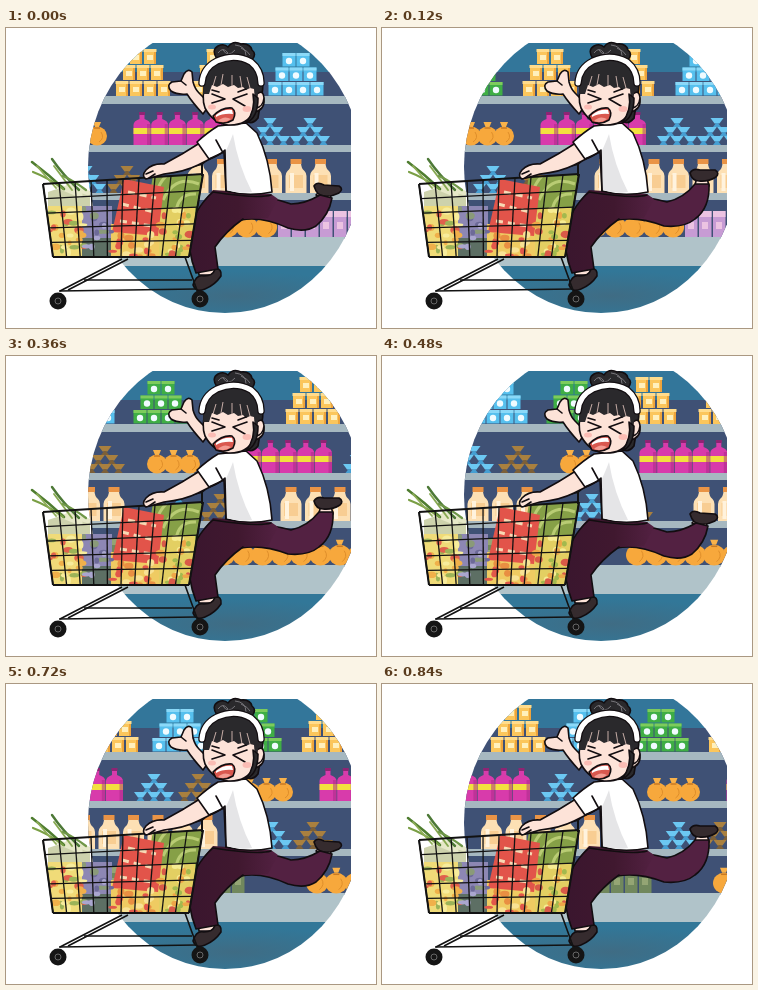
An HTML page for the animation above (960 ms loop, 370 px wide and 300 px high).

```html
<!DOCTYPE html>
<html lang="en">
<head>
<meta charset="utf-8">
<title>Shopping run</title>
<style>
  html, body { margin: 0; width: 100%; height: 100%; overflow: hidden; background: #fff; }
  svg { display: block; width: 370px; height: 300px; }
  #goods { animation: scroll 960ms step-end infinite; }
  #legLow { animation: low 240ms step-end infinite; }
  #legHigh { animation: high 240ms step-end infinite; }
  @keyframes scroll {
    0% { transform: translateX(0); }
    12.5% { transform: translateX(31px); }
    25% { transform: translateX(56px); }
    37.5% { transform: translateX(93px); }
    50% { transform: translateX(130px); }
    62.5% { transform: translateX(155px); }
    75% { transform: translateX(186px); }
    87.5%, 100% { transform: translateX(217px); }
  }
  @keyframes low { 0% { opacity: 1; } 50%, 100% { opacity: 0; } }
  @keyframes high { 0% { opacity: 0; } 50%, 100% { opacity: 1; } }
  .ink { stroke: #120d10; stroke-width: 1.6; stroke-linejoin: round; stroke-linecap: round; }
  .line { fill: none; }
  .skin { fill: #fde3d8; }
  .hair { fill: #2a292c; }
  .pants { fill: #532142; }
  .shoe { fill: #352b2e; }
</style>
</head>
<body>
<svg viewBox="0 0 370 300">
  <defs>
    <clipPath id="frame"><rect x="82" y="15" width="263" height="270"/></clipPath>
    <clipPath id="round"><ellipse cx="219" cy="139" rx="137" ry="146"/></clipPath>
    <clipPath id="basket"><path d="M37 156 197 146 183 229 47 229Z"/></clipPath>
    <radialGradient id="floor" cx=".55" cy=".6" r=".5">
      <stop offset="0" stop-color="#3f6c84"/><stop offset="1" stop-color="#327798"/>
    </radialGradient>
    <linearGradient id="thigh">
      <stop offset="0" stop-color="#3a162e"/><stop offset=".55" stop-color="#40182f"/><stop offset="1" stop-color="#532142"/>
    </linearGradient>
  </defs>

  <g clip-path="url(#frame)"><g clip-path="url(#round)">
    <rect x="80" y="15" width="270" height="30" fill="#33769a"/>
    <rect x="80" y="44" width="270" height="167" fill="#3f5175"/>
    <g fill="#a6b8c0">
      <rect x="80" y="68" width="270" height="8"/>
      <rect x="80" y="117" width="270" height="7"/>
      <rect x="80" y="165" width="270" height="7"/>
    </g>
    <rect x="80" y="209" width="270" height="29" fill="#b0c3c9"/>
    <rect x="80" y="238" width="270" height="50" fill="url(#floor)"/>
    <g id="goods"></g>
  </g></g>

  <!-- raised arm -->
  <path class="ink skin" d="M197 86Q186 74 181 66Q171 67 165 63Q160 57 166 54L175 53 178 46Q182 40 186 44L187 54Q189 61 193 65L204 76Z"/>
  <path class="ink line" stroke-width="1" d="M175 53 180 57"/>

  <!-- back leg, two poses -->
  <g id="legLow">
    <path class="ink skin" d="M310 167 315 162 326 166 322 174Z"/>
    <path class="ink shoe" d="M308 158Q311 153 318 157L333 158Q338 161 333 165Q325 169 318 168Q311 168 308 158Z"/>
    <path class="ink pants" d="M236 166Q262 168 285 176Q299 176 314 167L326 170Q323 187 310 198Q299 205 282 200Q256 188 235 192Z"/>
  </g>
  <g id="legHigh">
    <path class="ink skin" d="M313 157 315 149 325 150 327 158Z"/>
    <path class="ink shoe" d="M308 145Q311 140 318 142L333 142Q338 145 334 149Q326 154 317 153Q310 153 308 145Z"/>
    <path class="ink pants" d="M236 166Q262 168 285 174Q302 170 313 156L327 156Q328 180 313 191Q302 200 282 198Q256 188 235 192Z"/>
  </g>

  <!-- front leg -->
  <path class="ink skin" d="M192 238H210L209 247H193Z"/>
  <path class="ink shoe" d="M187 257Q190 246 198 248Q207 248 209 241Q216 240 215 248Q209 257 199 261Q190 265 187 257Z"/>
  <path fill="url(#thigh)" d="M207 162 265 166 272 171 262 190 237 191Q220 203 209 219L212 241 190 245Q181 222 184 203Q188 181 207 162Z"/>
  <path class="ink line" d="M265 167Q252 171 207 164Q188 181 184 203Q181 222 190 245L212 241 209 219Q220 203 237 191"/>

  <g id="load" clip-path="url(#basket)"></g>
  <g id="leeks"></g>
  <g id="cart"></g>

  <!-- shirt and near arm -->
  <path class="ink skin" d="M197 113 176 126 158 136Q147 135 140 142Q135 148 140 151L151 148 158 146Q178 144 192 137L210 128Z"/>
  <path class="ink line" stroke-width="1" d="M140 146 147 143M143 150 149 146"/>
  <path class="ink" fill="#fff" d="M212 98Q202 104 191 114L203 131 218 124 220 163Q242 169 266 164Q264 132 251 105L240 95Z"/>
  <path fill="#e5e5e7" d="M219 125Q224 114 227 106Q232 137 246 164Q232 166 221 162Z"/>
  <path class="ink line" d="M203 131Q213 128 219 122L220 163M210 112 216 123"/>

  <!-- head -->
  <path class="ink hair" d="M211 31Q205 22 212 18Q218 15 222 19Q227 12 235 16Q244 15 246 22Q251 26 246 32Z"/>
  <path fill="none" stroke="#77757a" d="M212 25Q217 18 222 25M217 22Q222 30 229 22M229 17Q240 18 240 28M235 20Q242 23 244 27"/>
  <path class="ink hair" d="M198 58Q194 40 212 31Q230 24 246 32Q260 44 256 66L252 90Q246 98 238 92L202 78Z"/>
  <path class="ink skin" d="M200 52Q195 70 199 80Q207 95 222 97Q240 98 248 84Q259 82 258 71Q256 64 251 68L248 50Q224 38 200 52Z"/>
  <path class="ink skin" stroke-width="1" d="M251 66Q257 61 258 70Q257 79 250 80Z"/>
  <path class="hair" d="M197 66 198 50Q202 40 210 36Q228 30 245 38Q254 45 253 62L249 74 248 61 244 60 240 62 237 59 232 60 228 57 222 59 217 56 211 59 206 57 203 66Z"/>
  <path fill="none" stroke="#eecfc6" stroke-width=".8" d="M207 58 210 48M215 57 217 46M226 58 226 47M236 60 234 48M244 60 241 49"/>
  <path class="ink hair" stroke-width="1" d="M247 66Q250 82 240 95Q252 90 252 70Z"/>
  <path fill="none" stroke="#120d10" stroke-width="7.5" stroke-linecap="round" d="M196 55Q197 40 211 33Q229 25 245 34Q255 42 255 55"/>
  <path fill="none" stroke="#fff" stroke-width="5" stroke-linecap="round" d="M196 55Q197 40 211 33Q229 25 245 34Q255 42 255 55"/>
  <path class="ink line" stroke-width="1.6" d="M206 66 219 71 206 75M241 66 227 71 239 78"/>
  <path class="ink line" stroke-width=".8" d="M206 62 213 64M232 64 240 61"/>
  <g fill="#fbbcb4"><ellipse cx="206" cy="79" rx="4" ry="2.5"/><ellipse cx="241" cy="81" rx="4.5" ry="3"/></g>
  <path class="ink" stroke-width="1" fill="#d9584f" d="M207 88Q216 79 226 80Q231 84 227 92Q219 97 210 94Z"/>
  <path fill="#fff" d="M210 87Q217 81 226 82L227 86Q217 85 210 89Z"/>
  <path fill="#f39c92" d="M212 93Q218 87 225 91Q219 96 212 93Z"/>
</svg>
<script>
  const put = (id, parts) => document.getElementById(id).innerHTML = parts.flat(Infinity).join('');
  const times = (n, make) => Array.from({ length: n }, (_, i) => make(i));
  const rect = (x, y, w, h, fill, extra = '') =>
    `<rect x="${x}" y="${y}" width="${w}" height="${h}" fill="${fill}" ${extra}/>`;
  const path = (d, fill, extra = '') => `<path d="${d}" fill="${fill}" ${extra}/>`;
  const circle = (x, y, r, fill, extra = '') =>
    `<circle cx="${x}" cy="${y}" r="${r}" fill="${fill}" ${extra}/>`;

  // Calls make(x, row) for each item in a pyramid, bottom row first.
  const pyramid = (cx, base, step, make) => times(3, row =>
    times(base - row, i => make(cx + (i - (base - row - 1) / 2) * step, row)));

  const jars = cx => pyramid(cx, 4, 14, (x, row) => {
    const y = 53 - row * 16;
    return [
      rect(x - 6, y, 12, 15, '#fbc65c'), rect(x - 6.5, y, 13, 3, '#ffdc8c'),
      rect(x - 3, y + 6, 6, 5, '#fff0bd'), rect(x + 4, y + 3, 2, 12, '#eea43c'),
    ];
  });
  const tins = (cx, face, lid) => pyramid(cx, 4, 14, (x, row) => {
    const y = 54 - row * 14.5;
    return [
      rect(x - 6.5, y, 13, 13.5, face), rect(x - 6.5, y, 13, 3, lid),
      circle(x, y + 8, 3.2, '#f0fbff'),
    ];
  });
  const blueTins = x => tins(x, '#56c0ee', '#8bd9f8');
  const greenTins = x => tins(x, '#3fae45', '#7dcc5c');

  const cups = (cx, face, shade) => floor => pyramid(cx, 3, 13.5, (x, row) => {
    const y = floor - row * 9;
    return path(`M${x - 6.5} ${y - 9}h13l-4 5.5h-5z`, face) +
      path(`M${x - 1} ${y - 4}h2l3 4h-8z`, shade);
  });
  const blueCups = x => cups(x, '#6cc8f2', '#469fd2');
  const goldCups = x => cups(x, '#a9803f', '#7d6038');

  const wine = x => [
    path(`M${x - 2.5} 85h5v6q6 2 6 6v20h-17v-20q0-4 6-6z`, '#d83bab'),
    rect(x - 3, 84, 6, 3, '#8f2474'), rect(x - 8.5, 100, 17, 6, '#f3e03f'),
    rect(x + 5, 96, 3.5, 21, '#a82a86', 'opacity=".5"'),
  ];
  const milk = x => [
    path(`M${x - 5} 135h10q0 5 3.5 8 2 2 2 5v17h-21v-17q0-3 2-5 3.5-3 3.5-8z`, '#fde0b4'),
    rect(x - 5.5, 131, 11, 5, '#ea9446'), rect(x - 7, 147, 14, 13, '#f8cd92'),
    rect(x - 6, 145, 4, 18, '#fff3de'),
  ];
  const sack = (x, floor, r) => [
    path(`M${x - 4} ${floor - 2.3 * r}h8l-2 5h-4z`, '#f9b24a'),
    `<ellipse cx="${x}" cy="${floor - r * .9}" rx="${r}" ry="${r * .95}" fill="#f7a83c"/>`,
    path(`M${x - 3} ${floor - 1.7 * r}h6`, 'none', 'stroke="#c97a24" stroke-width="1.5"'),
    path(`M${x + r * .4} ${floor - r * 1.3}q4 6-2 ${r}`, 'none', 'stroke="#df8e2a"'),
  ];
  const carton = (x, face, light) =>
    rect(x, 183, 12.5, 26, face) + rect(x, 183, 12.5, 6, light) + rect(x + 3, 194, 6, 7, light);

  put('goods', [
    [-81, 137, 214].map(jars), [-12, 290].map(blueTins), greenTins(62),
    [-166, 136].map(x => times(6, i => wine(x + 17.7 * i))),
    [-38, 264, 304].map(x => blueCups(x)(117)), goldCups(6)(117),
    times(3, i => sack(58 + 16.5 * i, 117, 10)),
    [-107.5, 192].map(x => times(6, i => milk(x + 24.5 * i))),
    blueCups(80)(165), goldCups(121)(165),
    times(10, i => carton(-86 + 14 * i, '#71885d', '#94a574')),
    times(8, i => sack(125 + 19.3 * i, 209, 11)),
    times(6, i => carton(272 + 14 * i, '#c79bd4', '#ecc3e2')),
  ]);

  let seed = 11;
  const random = () => (seed = seed * 16807 % 2147483647) / 2147483647;
  const speckle = (n, x, y, w, h, colors) => times(n, i =>
    `<ellipse cx="${x + random() * w}" cy="${y + random() * h}" rx="${2 + random() * 3}" ry="${1.5 + random() * 2.5}" fill="${colors[i % colors.length]}"/>`);

  put('load', [
    path('M42 164 60 158 84 163 84 178 42 182Z', '#cdd2ac'),
    path('M145 160Q147 129 176 135L198 144 190 190 150 190Z', '#86a047'),
    path('M152 160Q163 136 188 142M157 172Q169 146 193 156M170 184Q172 165 190 166', 'none', 'stroke="#b9cc74" stroke-width="3"'),
    rect(42, 178, 36, 52, '#f0db78'), rect(76, 178, 30, 34, '#8d87b4'), rect(76, 210, 30, 20, '#5d6f64'),
    rect(105, 196, 49, 34, '#efcb62'), rect(153, 180, 36, 50, '#e3cf62'),
    path('M118 151 158 159 152 208 106 204Z', '#e2544a'),
    path('M122 164 150 170M116 176 148 184M114 193 146 198', 'none', 'stroke="#f8d9b4" stroke-width="3" stroke-dasharray="7 5"'),
    speckle(28, 44, 182, 34, 46, ['#e0604c', '#f7ec9c', '#9cb358', '#f0b04a']),
    speckle(12, 78, 180, 26, 48, ['#aaa6cf', '#6d6a98', '#8a9a78']),
    speckle(18, 106, 206, 46, 22, ['#e2574a', '#f8e294', '#e98f42']),
    speckle(24, 154, 182, 30, 46, ['#d95a48', '#f6ec92', '#a3b94e', '#eea648']),
  ]);

  const stalk = (d, color, width) =>
    path(d, 'none', `stroke="${color}" stroke-width="${width}" stroke-linecap="round"`);
  put('leeks', [
    stalk('M52 158 74 167M62 158 82 165', '#e6e8c8', 5),
    stalk('M26 134Q42 146 58 161', '#4f7d30', 2.6),
    stalk('M27 144Q43 150 57 161', '#7a9f45', 2.2),
    stalk('M31 138 50 160', '#8fae58', 1.8),
    stalk('M46 131Q57 147 73 162', '#4d7937', 2.4),
    stalk('M48 138 66 162', '#86a850', 1.8),
    stalk('M57 148Q68 153 80 162', '#6f9748', 2.2),
  ]);

  // Basket wires run between matching points of its four edges.
  const mix = (a, b, t) => [a[0] + (b[0] - a[0]) * t, a[1] + (b[1] - a[1]) * t];
  const [topL, topR, lowR, lowL] = [[37, 156], [197, 146], [183, 229], [47, 229]];
  const bar = (d, width) => path(d, 'none', `stroke="#121212" stroke-width="${width}" stroke-linejoin="round"`);
  const wire = (a, b, width) => bar(`M${a}L${b}`, width);
  const wheel = (x, y) => circle(x, y, 8.5, '#151515') + circle(x, y, 3, 'none', 'stroke="#666"');

  put('cart', [
    times(11, i => wire(mix(topL, topR, i / 10), mix(lowL, lowR, i / 10), 1.3)),
    times(6, i => wire(mix(topL, lowL, i / 5), mix(topR, lowR, i / 5), i % 5 ? 1.3 : 2)),
    wire(topL, lowL, 2), wire(topR, lowR, 2),
    bar('M140 150 196 136 205 128M196 136V148', 2),
    bar('M116 231 54 263M122 231 62 262M179 229 192 265', 1.6),
    bar('M53 263 190 261M78 252 186 252', 1.4),
    wheel(52, 273), wheel(194, 271),
  ]);
</script>
</body>
</html>
```
